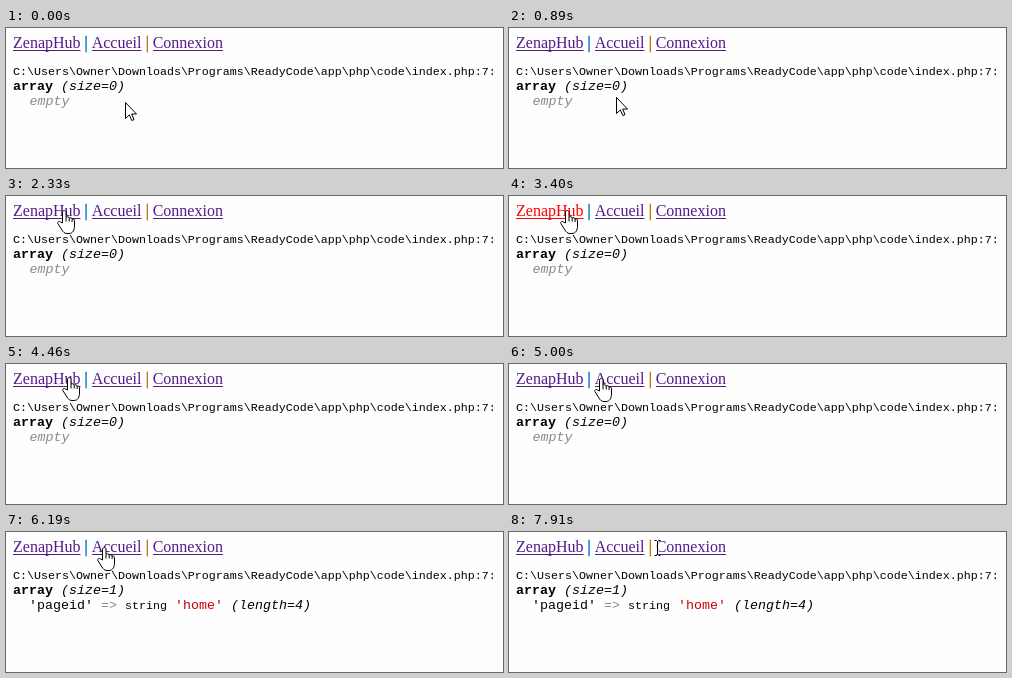
An HTML page that plays this animation: 497 px wide and 140 px high, repeating every 8000 ms.

```html
<!DOCTYPE html>
<html lang="fr">
<head>
<meta charset="utf-8">
<title>Navigation</title>
<style>
html, body { margin: 0; width: 100%; height: 100%; overflow: hidden; background: #fefefe; }
svg { display: block; }
text { white-space: pre; }
.nav { font: 16px "Liberation Serif", "Times New Roman", serif; }
.dump { font: 13.333px "Liberation Mono", "Courier New", monospace; }
.small { font-size: 11.667px; }
.link { fill: #551a8b; }
.link.active { fill: #f00; }
.bar { stroke-width: .5; }
.bar.blue { fill: #0a78c8; stroke: #0a78c8; }
.bar.orange { fill: #cc6a00; stroke: #cc6a00; }
.bold { font-weight: bold; }
.italic { font-style: italic; }
.grey { fill: #888a85; }
.red { fill: #c00; }
#cursors path { fill: #fff; stroke: #000; stroke-width: 1; }
#cursors .line { fill: none; }
#cursors .halo { stroke: #fff; stroke-width: 2.4; }
</style>
</head>
<body>
<svg width="497" height="140" viewBox="0 0 497 140">
  <g class="nav">
    <g class="link" id="brand"><text x="7" y="20">ZenapHub</text><rect x="7" y="22" width="67.5" height="1"/></g>
    <text class="bar blue" x="78.5" y="20">|</text>
    <g class="link" id="home"><text x="85.7" y="20">Accueil</text><rect x="86" y="22" width="49.5" height="1"/></g>
    <text class="bar orange" x="139.7" y="20">|</text>
    <g class="link"><text x="146.7" y="20">Connexion</text><rect x="147" y="22" width="70" height="1"/></g>
  </g>
  <g class="dump">
    <text class="small" x="7" y="47">C:\Users\Owner\Downloads\Programs\ReadyCode\app\php\code\index.php:7:</text>
    <text x="7" y="62"><tspan class="bold">array</tspan> <tspan class="italic" id="size"></tspan></text>
    <text class="italic grey" id="empty" x="23.5" y="77">empty</text>
    <text id="entry" x="23" y="77">'pageid' <tspan class="grey">=&gt;</tspan> <tspan class="small">string</tspan> <tspan class="red">'home'</tspan> <tspan class="italic">(length=4)</tspan></text>
  </g>
  <g id="cursors">
    <g id="arrow"><path d="M.5 .5V16.5L4.3 12.9 6.8 18.5 9 17.6 6.6 12H11.5Z"/></g>
    <g id="hand">
      <path d="M5.5 13V2.2C5.5 0 9 0 9 2.2V7.5C9.6 6.3 12 6.4 12.2 8.2C13 7.2 15 7.6 15.1 9.2C16 8.5 17.5 9.2 17.5 10.8V16C17.5 20 15.8 23.5 12 23.5H10C7.5 23.5 6.2 22 5 20L1 13.8C0 12 2.2 10.6 3.6 12Z"/>
      <path class="line" d="M9 7.5V11.5M12.2 8.2V11.5M15.1 9.2V12"/>
    </g>
    <g id="beam">
      <path class="halo" d="M3.5 1.5V14.5"/>
      <path class="line" d="M.5 .5H2.5L3.5 1.5 4.5 .5H6.5M3.5 1.5V14.5M.5 15.5H2.5L3.5 14.5 4.5 15.5H6.5"/>
    </g>
  </g>
</svg>
<script>
const LOOP = 8000;
const $ = id => document.getElementById(id);
const shapes = ["arrow", "hand", "beam"];

const TICK = 130;
const runs = [
  ["arrow", 0, [119, 74]],
  ["arrow", 500, [110, 71], [105, 69]],
  ["arrow", 890, [107, 69]],
  ["arrow", 1160, [103, 65], [95, 57], [87, 47], [79, 38], [72, 31], [67, 27], [64, 25]],
  ["hand", 2070, [59, 20], [54, 16], [51, 14]],
  ["hand", 4460, [56, 13], [63, 12]],
  ["beam", 4720, [77, 7], [82, 7]],
  ["hand", 5000, [85, 14]],
  ["hand", 5260, [89, 15], [91, 15]],
  ["hand", 7520, [96, 15], [108, 15], [124, 14]],
  ["beam", 7910, [145, 8]]
];

const show = (id, on) => $(id).setAttribute("visibility", on ? "visible" : "hidden");
const within = (t, from, to) => t >= from && t < to;

function draw(t) {
  const [shape, start, ...points] = runs.filter(run => run[1] <= t).pop();
  const step = Math.min(points.length - 1, Math.floor((t - start) / TICK));
  shapes.forEach(id => show(id, id === shape));
  $(shape).setAttribute("transform", `translate(${points[step]})`);

  $("brand").classList.toggle("active", within(t, 3400, 3530));
  $("home").classList.toggle("active", within(t, 5930, 6060));

  const loaded = t >= 6190;
  $("size").textContent = `(size=${loaded ? 1 : 0})`;
  show("empty", !loaded);
  show("entry", loaded);
}

const origin = performance.now();
function tick() {
  draw((performance.now() - origin) % LOOP);
  requestAnimationFrame(tick);
}
tick();
</script>
</body>
</html>
```
